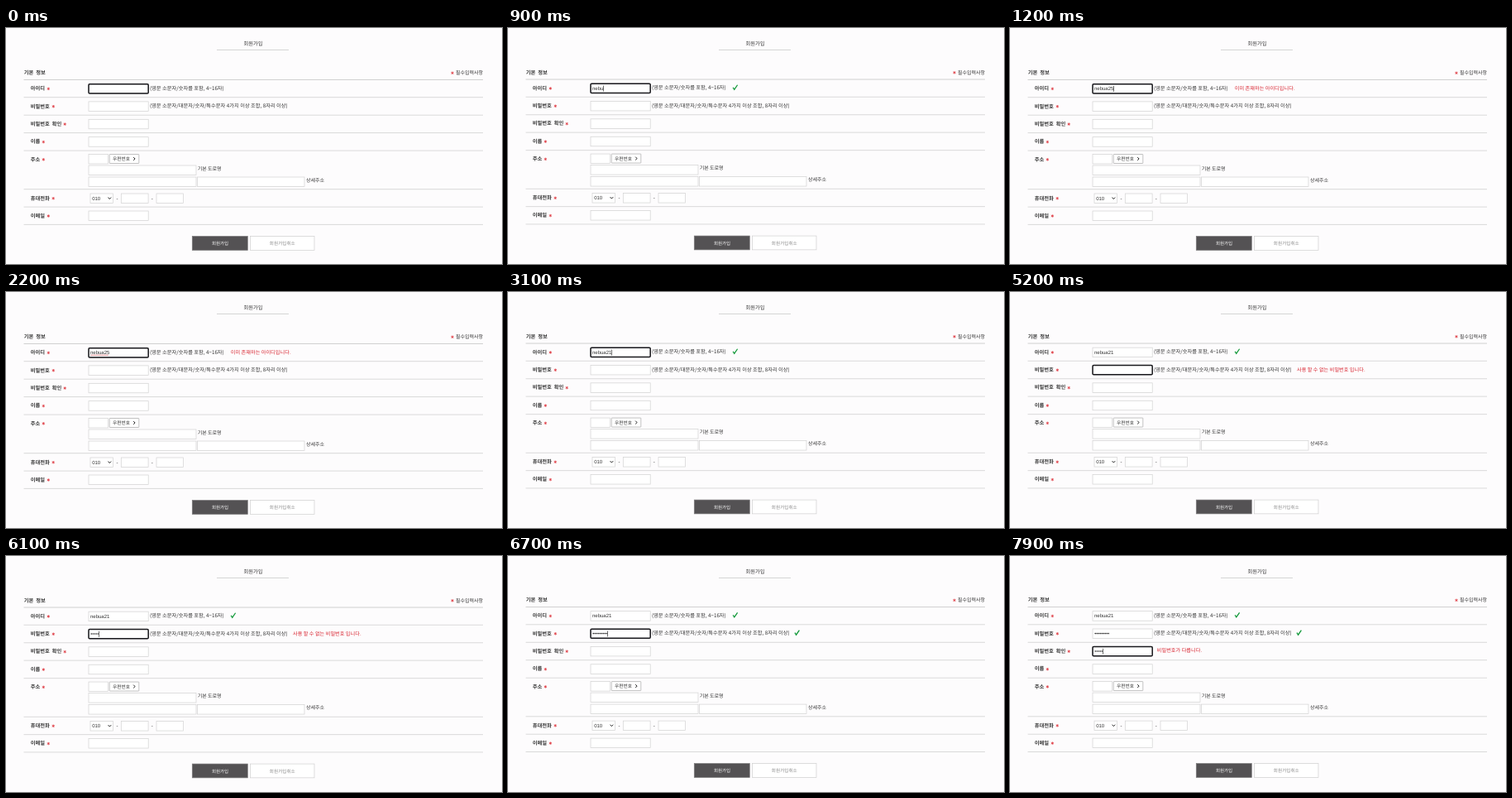
Write an HTML page that moves like this. It is 600 px wide and 285 px high and loops after 8000 ms.

```html
<!DOCTYPE html>
<html>
<head>
<meta charset="utf-8">
<title>회원가입</title>
<style>
html, body { margin: 0; width: 100%; height: 100%; overflow: hidden; background: #fdfcfd; }
svg { display: block; width: 100vw; height: 100vh; }
text { font: 6.25px 'Noto Sans CJK KR', 'Noto Sans CJK', sans-serif; fill: #333; white-space: pre; text-rendering: geometricPrecision; }
.label { font-weight: 700; word-spacing: 1.5px; }
.latin { font: 6px 'Liberation Sans', Arial, sans-serif; }
.error { fill: #d8232f; font-size: 6.2px; }
</style>
</head>
<body>
<svg id="stage" viewBox="0 0 600 285"></svg>
<script>
const LOOP = 8000;
const NS = 'http://www.w3.org/2000/svg';
const stage = document.getElementById('stage');

function add(parent, tag, attrs, content) {
  const el = document.createElementNS(NS, tag);
  for (const key in attrs) el.setAttribute(key, attrs[key]);
  if (content !== undefined) el.textContent = content;
  parent.appendChild(el);
  return el;
}

const label = (g, x, mid, str, attrs) => add(g, 'text', { x, y: mid + 2.2, ...attrs }, str);
const sized = (size, extra) => ({ style: `font-size:${size}px`, ...extra });
const box = (g, x, y, width, height = 11.5, attrs) =>
  add(g, 'rect', { x, y, width, height, fill: '#fff', stroke: '#d2d2d2', 'stroke-width': 0.7, ...attrs });
const rule = (g, x1, x2, y, stroke) =>
  add(g, 'path', { d: `M${x1} ${y}H${x2}`, stroke, 'stroke-width': 0.7 });
const stroke = (g, d, color, width) =>
  add(g, 'path', { d, fill: 'none', stroke: color, 'stroke-width': width });
const star = (g, x, y) =>
  stroke(g, `M${x} ${y - 1.7}v3.4M${x - 1.5} ${y - 0.85}l3 1.7M${x + 1.5} ${y - 0.85}l-3 1.7`, '#e0434b', 0.9);
const tick = (g, x, y) => stroke(g, `M${x} ${y}l1.6 2.5 3.8 -5.6`, '#159a3c', 1.3);
const show = (el, on) => el.setAttribute('visibility', on ? 'visible' : 'hidden');

// Title
label(stage, 299, 18.8, '회원가입', { 'text-anchor': 'middle' });
rule(stage, 255, 342, 26.5, '#c4c4c4');

// Form
const form = add(stage, 'g', {});
label(form, 21.8, 54, '기본 정보', { class: 'label' });
star(form, 540, 54.3);
label(form, 577, 54, '필수입력사항', sized(6, { 'text-anchor': 'end' }));

rule(form, 21.5, 577, 62.5, '#bdbdbd');
[83.7, 105.2, 126.6, 148.1, 194.7, 216.1, 237.4].forEach(y => rule(form, 21.5, 577, y, '#cbcbcb'));

[['아이디', 73, 51.3], ['비밀번호', 94.3, 57.3], ['비밀번호 확인', 115.7, 71.2], ['이름', 137.2, 45.3],
 ['주소', 158.4, 45.3], ['휴대전화', 205.3, 57.2], ['이메일', 226.6, 51.3]].forEach(([str, y, x]) => {
  label(form, 29.8, y, str, { class: 'label' });
  star(form, x, y + 0.4);
});

label(form, 174, 72.7, '(영문 소문자/숫자를 포함, 4~16자)', sized(6.25));
label(form, 174, 94, '(영문 소문자/대문자/숫자/특수문자 4가지 이상 조합, 8자리 이상)', sized(6.25));

const fieldTop = [67.6, 88.9, 110.3];
[...fieldTop, 131.7, 221].forEach(y => box(form, 100, y, 72.2));

// Address
box(form, 100, 152.5, 23.5);
box(form, 125.2, 152.5, 35.6, 11, { stroke: '#a8a8a8', rx: 0.5 });
label(form, 129, 158, '우편번호', sized(5.75));
stroke(form, 'M154.2 156.1l1.9 1.9 -1.9 1.9', '#222', 1);
box(form, 100, 166, 130);
label(form, 231.7, 169.4, '기본 도로명', sized(6));
box(form, 100, 180, 130);
box(form, 231.5, 180, 129.5);
label(form, 363, 183.6, '상세주소', sized(6));

// Phone
box(form, 102, 200, 27.5);
label(form, 104.2, 205.5, '010', { class: 'latin' });
stroke(form, 'M123.6 204.6l1.8 1.9 1.8 -1.9', '#222', 1);
box(form, 139.3, 200, 32.8);
box(form, 182, 200, 32.5);
[133.4, 175.8].forEach(x => label(form, x, 205.4, '-', { class: 'latin' }));

// Buttons
box(form, 225.3, 251.5, 67, 16.8, { fill: '#545254', stroke: '#7a787a' });
label(form, 259, 260, '회원가입', sized(5.5, { 'text-anchor': 'middle', fill: '#fff' })).style.fill = '#fff';
box(form, 295.4, 251.5, 77.6, 16.8, { stroke: '#cfcfcf' });
label(form, 334.3, 260, '회원가입취소', sized(5.6, { 'text-anchor': 'middle' })).style.fill = '#8a8a8a';

// Live parts
const focusRing = box(form, 100, 0, 72.2, 11.2, { fill: 'none', stroke: '#18181c', 'stroke-width': 1.5, rx: 1.3 });
const idText = label(form, 102, 73.2, '', { class: 'latin' });
const squiggle = stroke(form, '', '#e0525a', 0.6);
const dots = [94.5, 115.9].map(y => ({ y, path: add(form, 'path', { fill: '#222' }) }));
const caret = add(form, 'rect', { width: 0.6, height: 7, fill: '#111' });
const idTick = tick(form, 272.2, 72.3);
const pwTick = tick(form, 347, 93.6);
const idError = label(form, 271.8, 72.7, '이미 존재하는 아이디입니다.', { class: 'error' });
const pwError = label(form, 347, 94, '사용 할 수 없는 비밀번호 입니다.', { class: 'error' });
const matchError = label(form, 177.8, 114.8, '비밀번호가 다릅니다.', { class: 'error' });

const TAKEN = 'nebua25';
const FREE = 'nebua21';
const idKeys = [600, 700, 800, 900, 1000, 1100, 1200];
const pwKeys = [5400, 5600, 5800, 5900, 6100, 6200, 6300, 6300, 6600];
const againKeys = [7300, 7500, 7600, 7700, 7900];
const blinks = [400, 1500, 1800, 2200, 2400, 3400, 3800, 4100, 4400, 5200, 5400];

const passed = (times, t) => times.filter(at => at <= t).length;
const within = (t, from, to) => t >= from && t < to;

function idAt(t) {
  if (t < 2400) return TAKEN.slice(0, passed(idKeys, t));
  return FREE.slice(0, t < 2900 ? 6 : 7);
}

function drawDots({ y, path }, count) {
  let d = '';
  for (let i = 0; i < count; i++) d += `M${102.4 + 2 * i} ${y}a.8 .8 0 1 0 1.6 0a.8 .8 0 1 0 -1.6 0`;
  path.setAttribute('d', d);
}

function render(t) {
  const id = idAt(t);
  const counts = [passed(pwKeys, t), passed(againKeys, t)];
  const field = t < 4500 ? 0 : t < 6900 ? 1 : 2;
  const idOk = id.length > 3 && id !== TAKEN;
  const pwOk = counts[0] === 9;

  form.setAttribute('transform', `translate(0 ${-0.45 * (idOk + pwOk)})`);
  idText.textContent = id;
  const idWidth = id ? idText.getComputedTextLength() : 0;
  dots.forEach((row, i) => drawDots(row, counts[i]));

  focusRing.setAttribute('y', fieldTop[field] + 0.15);
  caret.setAttribute('x', field ? 102.2 + 2 * counts[field - 1] : 102 + idWidth);
  caret.setAttribute('y', fieldTop[field] + 2.4);
  show(caret, passed(blinks, t) % 2);

  let wave = 'M102 76.6';
  for (let x = 0; x + 2 <= idWidth; x += 2) wave += 'l1 -.7l1 .7';
  squiggle.setAttribute('d', wave);
  show(squiggle, within(t, 1800, 2400) || within(t, 3700, 4500));

  show(idTick, idOk);
  show(pwTick, pwOk);
  show(idError, id === TAKEN);
  show(pwError, within(t, 4600, 6600));
  show(matchError, t >= 7000);
}

const start = performance.now();
function frame() {
  render((performance.now() - start) % LOOP);
  requestAnimationFrame(frame);
}
frame();
</script>
</body>
</html>
```
